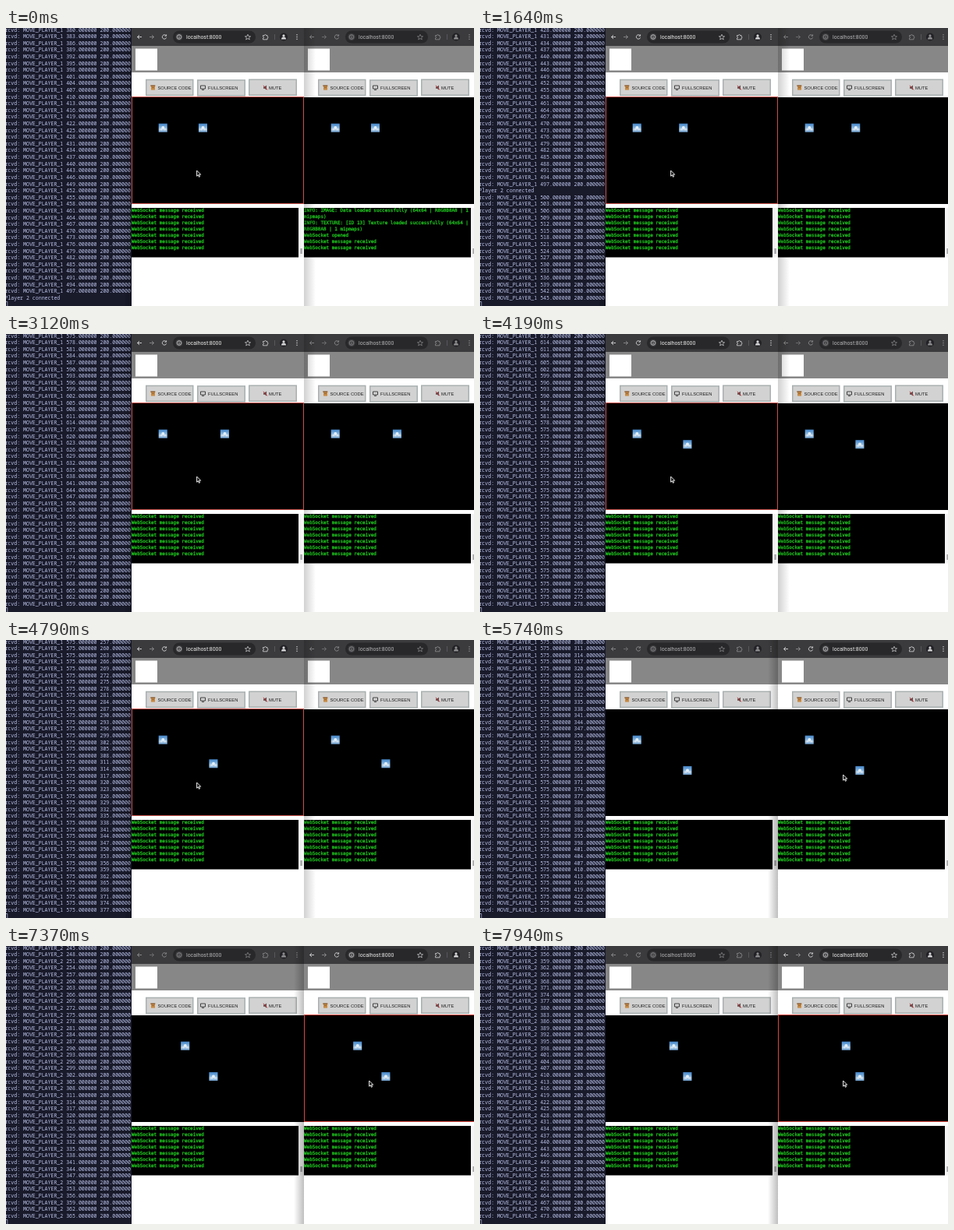
An HTML page with a canvas that plays this animation: 600 by 357 pixels, repeating every 8000 ms.

```html
<!DOCTYPE html>
<html lang="en">
<head>
<meta charset="utf-8">
<title>Two clients, one server</title>
<style>
html, body { margin: 0; width: 100%; height: 100%; overflow: hidden; background: #fff; }
canvas { display: block; width: 600px; height: 357px; }
</style>
</head>
<body>
<canvas id="stage" width="600" height="357"></canvas>
<script>
const ctx = document.getElementById('stage').getContext('2d');
const LOOP = 8000, SPLIT = 382, WINDOW_X = 161, WINDOW_W = 221, SCALE = 0.1725;
const SWITCH_WINDOW = 5740, FOCUS_RIGHT = 6510;
const TERMINAL_FONT = '500 6.57px "Noto Sans Mono", monospace';
const LOG_FONT = '5.94px "DejaVu Sans Mono", monospace';

// Bursts of received messages: first step, last step, steps, total at the end.
const BURSTS = [
  [1040, 1220, 4, 13], [1640, 1870, 5, 28], [2230, 2760, 10, 60], [3060, 3600, 10, 94],
  [3780, 4190, 8, 120], [4250, 5090, 15, 170], [6510, 6850, 7, 193], [6910, 7940, 19, 261]
];
const STARTUP_LOG = [
  'INFO: IMAGE: Data loaded successfully (64x64 | R8G8B8A8 | 1',
  'mipmaps)',
  'INFO: TEXTURE: [ID 13] Texture loaded successfully (64x64 |',
  'R8G8B8A8 | 1 mipmaps)',
  'WebSocket opened'
];

const clamp = (v, lo, hi) => Math.min(hi, Math.max(lo, v));

// Share of a stepped move that is done at time t.
const stepped = (t, start, end, steps) =>
  t < start ? 0 : Math.min(steps, Math.floor((t - start) / (end - start) * (steps - 1) + 0.01) + 1) / steps;

function messageCount(t) {
  let total = 0;
  for (const [start, end, steps, target] of BURSTS) {
    total += Math.floor((target - total) * stepped(t, start, end, steps) + 1e-6);
    if (t < end) break;
  }
  return total;
}

const player1 = n => [
  n <= 60 ? 497 + 3 * n : Math.max(575, 677 - 3 * (n - 60)),
  200 + 3 * clamp(n - 94, 0, 76)
];
const player2 = n => [200 + 3 * Math.max(0, n - 170), 200];

function serverLine(i) {
  if (i === 0) return 'Player 2 connected';
  const id = i > 170 ? 2 : 1;
  const [x, y] = id === 2 ? player2(i) : player1(i < 0 ? i + 1 : i);
  return `rcvd: MOVE_PLAYER_${id} ${x}.000000 ${y}.000000`;
}

function rect(x, y, w, h, fill) {
  ctx.fillStyle = fill;
  ctx.fillRect(x, y, w, h);
}

function text(str, x, y, font, fill, weight = 0) {
  ctx.font = font;
  ctx.fillStyle = ctx.strokeStyle = fill;
  ctx.fillText(str, x, y);
  if (weight) {
    ctx.lineWidth = weight;
    ctx.strokeText(str, x, y);
  }
}

function stroke(path, color, width = 1) {
  ctx.strokeStyle = color;
  ctx.lineWidth = width;
  ctx.stroke(new Path2D(path));
}

function shape(path, color) {
  ctx.fillStyle = color;
  ctx.fill(new Path2D(path));
}

function disc(x, y, r, color) {
  ctx.fillStyle = color;
  ctx.beginPath();
  ctx.arc(x, y, r, 0, 7);
  ctx.fill();
}

function shadow(from, to, alpha) {
  const g = ctx.createLinearGradient(from, 0, to, 0);
  g.addColorStop(0, `rgba(0,0,0,${alpha})`);
  g.addColorStop(1, 'rgba(0,0,0,0)');
  rect(Math.min(from, to), 0, Math.abs(to - from), 357, g);
}

function drawTerminal(n) {
  rect(0, 0, WINDOW_X, 357, '#191a2a');
  for (let row = 0; row <= 40; row++) {
    text(serverLine(n - 40 + row), -1.6, 4.5 + row * 8.61, TERMINAL_FONT, '#bcc4ea');
  }
  stroke('M-1 351.5H1.8V358', '#bcc4ea', 0.7);
}

function drawToolbar(active) {
  const ink = active ? '#d4d4d6' : '#8c8c8f';
  rect(0, 0, WINDOW_W, 23, '#3b3b3d');
  ctx.fillStyle = '#28282a';
  ctx.beginPath();
  ctx.roundRect(53, 3.5, 106, 16, 8);
  ctx.fill();
  stroke('M13 11.5H7.5M10 9L7.5 11.5L10 14', ink, 0.9);
  stroke('M23 11.5H28.5M26 9L28.5 11.5L26 14', active ? '#8c8c8f' : '#707073', 0.9);
  stroke('M44.2 9.8A2.7 2.7 0 1 0 44.6 12.3M44.6 8.3V10.2H42.6', ink, 0.9);
  disc(61, 11.5, 4.6, '#414144');
  stroke('M58.2 11.5a2.8 2.8 0 1 0 5.6 0a2.8 2.8 0 1 0 -5.6 0M61 11.2V13.2M61 9.6V10.4', ink, 0.8);
  text('localhost:8000', 70, 14.1, '6.9px Roboto, sans-serif', active ? '#ededed' : '#b5b5b8');
  stroke('M149 8.2L150 10.6L152.6 10.8L150.6 12.4L151.3 14.9L149 13.5L146.7 14.9L147.4 12.4L145.4 10.8L148 10.6Z', ink, 0.7);
  stroke('M168.5 9.5H170.5A1 1 0 0 1 172.5 9.5H174V11A1 1 0 0 1 174 13V14.8H168.5V13A1 1 0 0 0 168.5 11Z', ink, 0.8);
  rect(183, 8, 0.7, 7, '#66666a');
  disc(195, 11.5, 5, '#222226');
  disc(195, 9.9, 1.6, ink);
  shape('M192 14.6A3 3 0 0 1 198 14.6Z', ink);
  for (const y of [8.8, 11.5, 14.2]) disc(212, y, 0.75, ink);
}

function drawButton(x, y, w, label, labelX) {
  rect(x, y, w, 21.5, '#a9b0b0');
  rect(x + 1.5, y + 1.5, w - 3, 18.5, '#d2d2d2');
  text(label, labelX, 79, '5.8px "Liberation Sans", sans-serif', '#1c1c1c');
}

function drawButtons() {
  drawButton(18, 65.7, 61.5, 'SOURCE CODE', 33.5);
  drawButton(84, 66.2, 62, 'FULLSCREEN', 98);
  drawButton(150, 65.5, 62, 'MUTE', 176);
  rect(25, 74, 5, 5.6, '#c98b43');
  rect(24.3, 73.4, 6, 1.4, '#8a5a2c');
  rect(26, 76, 3, 0.6, '#7a5128');
  stroke('M88.5 74H94.5V78H88.5ZM90 79.4H93', '#333', 0.9);
  shape('M169 75.5H170.7L173 73.5V79.5L170.7 77.7H169Z', '#5d4a4a');
  stroke('M169 73.8L174 79.4', '#c3343c', 1);
}

function drawPlayer([x, y]) {
  const size = 64 * SCALE, left = x * SCALE + 0.2, top = 88.2 + y * SCALE;
  const sky = ctx.createLinearGradient(0, top, 0, top + size);
  sky.addColorStop(0, '#4484c6');
  sky.addColorStop(0.45, '#7fb2e0');
  sky.addColorStop(0.7, '#b4d0e8');
  sky.addColorStop(1, '#6a9ccc');
  rect(left, top, size, size, sky);
  disc(left + 5.6, top + 5.4, 2, '#e6f0f8');
  disc(left + 3.4, top + 7.4, 1.3, '#d4e4f2');
  disc(left + 8, top + 7.4, 1.3, '#d4e4f2');
}

function drawBrowser(x, n, active, border, log) {
  ctx.save();
  ctx.translate(x, 0);
  ctx.beginPath();
  ctx.rect(0, 0, WINDOW_W, 357);
  ctx.clip();
  rect(0, 0, WINDOW_W, 357, '#fff');
  drawToolbar(active);
  rect(0, 23, WINDOW_W, 34, '#878787');
  rect(5, 26.5, 28, 28, '#fff');
  drawButtons();
  rect(0, 89, WINDOW_W, 137, '#000');
  drawPlayer(player2(n));
  drawPlayer(player1(n));
  if (border) {
    ctx.strokeStyle = border;
    ctx.lineWidth = 1;
    ctx.strokeRect(0.5, 88.5, 220, 137);
  }
  rect(0, 231, 214, 63.5, '#000');
  rect(214, 231, 7, 63.5, '#f4f4f4');
  rect(216.4, 283, 2.4, 7, '#a5a5a8');
  log.forEach((line, i) => text(line, 0, 236.3 + i * 8, LOG_FONT, '#1fc41f', 0.3));
  ctx.restore();
}

function drawPointer(t) {
  const k = stepped(t, 5270, 5560, 6);
  const ease = k * k * (3 - 2 * k);
  ctx.save();
  ctx.translate(244.6 + 221 * ease, 183 - 10 * ease);
  const arrow = 'M0 0V7.2L1.7 5.7L2.8 8.3L4 7.8L2.9 5.2H5.1Z';
  shape(arrow, '#111');
  stroke(arrow, '#fff', 0.9);
  ctx.restore();
}

function draw(t) {
  const n = messageCount(t);
  const leftActive = t < SWITCH_WINDOW;
  const message = 'WebSocket message received';
  const leftLog = Array(7).fill(message);
  const rightLog = leftLog.map((_, i) => STARTUP_LOG[n + i] || message);

  drawTerminal(n);
  if (leftActive) shadow(WINDOW_X, 151, 0.2);
  drawBrowser(WINDOW_X, n, leftActive, leftActive && '#c8504a', leftLog);
  drawBrowser(SPLIT, n, !leftActive, t >= FOCUS_RIGHT && '#d8483f', rightLog);
  if (leftActive) shadow(SPLIT, 397, 0.18);
  else shadow(SPLIT, 369, 0.25);
  drawPointer(t);
}

function tick() {
  draw(performance.now() % LOOP);
  requestAnimationFrame(tick);
}
tick();
</script>
</body>
</html>
```
